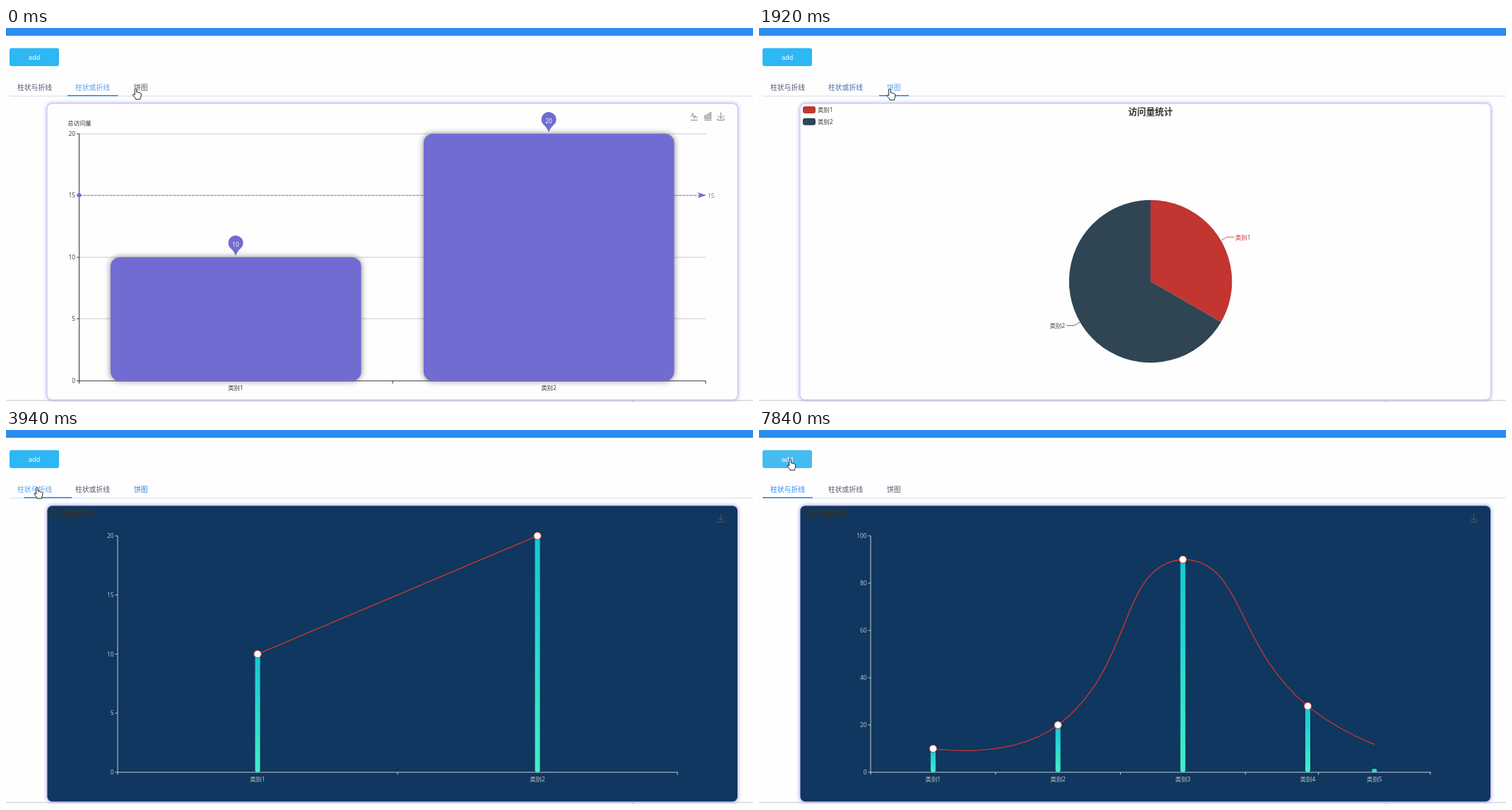
An HTML page with a canvas for the animation above (7.99 s loop, 1057 px wide and 530 px high).

```html
<!DOCTYPE html>
<html lang="zh">
<head>
<meta charset="utf-8">
<style>
html, body { margin: 0; width: 100%; height: 100%; overflow: hidden; background: #fefefe; }
canvas { display: block; }
</style>
</head>
<body>
<canvas id="stage" width="1057" height="530"></canvas>
<script>
const c = document.getElementById('stage').getContext('2d');
const LOOP = 7990, SMALL = 8.4, MEDIUM = 9.8, LARGE = 12.6;
const SANS = '"Open Sans", "Noto Sans CJK SC", "Noto Sans CJK", sans-serif';
const BLUE = '#2d8cf0', HOVER = '#57a3f3', INK = '#515a6e';
const PURPLE = '#716cd1', RED = '#c23531', SLATE = '#2f4554', NAVY = '#0f375f';

// The screen refreshes in bursts: [first, last, steps]
const bursts = [[0, 0, 1], [120, 1000, 7], [1160, 1470, 3], [1770, 1920, 2], [2040, 2740, 6],
  [2860, 3670, 7], [3940, 4360, 4], [4630, 4780, 2], [4900, 5590, 6], [5740, 5740, 1],
  [6140, 6140, 1], [6420, 6420, 1], [6540, 7320, 7], [7470, 7840, 3]];
const ticks = bursts.flatMap(([a, b, n]) =>
  Array.from({ length: n }, (_, i) => Math.round(a + (b - a) * i / Math.max(n - 1, 1))));

// Pointer path: [time, x, y]
const route = [[0, 183.5, 85], [120, 250, 100], [267, 430, 130], [413, 570, 155], [560, 602, 164],
  [707, 606, 166], [860, 606, 166], [1000, 235, 83], [1160, 186, 86], [1470, 185, 86], [1920, 185, 86],
  [2040, 187, 89], [2320, 250, 190], [2740, 425, 330], [2860, 470, 345], [3000, 475, 348],
  [3130, 410, 300], [3400, 130, 125], [3535, 55, 86], [3670, 44, 81], [3940, 44, 81],
  [4080, 44, 76], [4220, 44, 50], [4360, 44, 41]];

const buttonShades = [[0, '#2db7f5'], [4200, '#57c5f7'], [4620, '#2baee9'], [4759, '#57c5f7'],
  [6050, '#2baee9'], [6310, '#57c5f7'], [7600, '#2baee9'], [7720, '#57c5f7']];
const tabs = [
  { name: '柱状与折线', x: 16, left: 5, width: 71,
    shades: [[0, INK], [3480, HOVER], [4100, BLUE]] },
  { name: '柱状或折线', x: 98, left: 87, width: 71.5,
    shades: [[0, HOVER], [20, BLUE], [1750, INK]] },
  { name: '饼图', x: 181, left: 170, width: 42,
    shades: [[0, INK], [40, HOVER], [120, INK], [1080, HOVER], [2050, BLUE], [3880, INK]] }
];
const values = [10, 20, 90, 28, 4], adds = [4759, 6386, 7772];

const icons = {
  line: 'M4.1,28.9h7.1l9.3-22l7.4,38l9.7-19.7l3,12.8h14.9M4.1,58h51.4',
  bar: 'M6.7,22.9h10V48h-10zM24.9,13h10v35h-10zM43.2,2h10v46h-10zM3.1,58h53.7',
  save: 'M4.7,22.9L29.3,45.5L54.7,23.4M4.6,43.6V58H53.8V43.6M29.2,45.1V0'
};
const arrow = new Path2D('M0 0V11.5L2.7 9 4.6 13 6.4 12.2 4.6 8.4H8Z');
const hand = new Path2D('M-1.3 1.2Q0-.6 1.3 1.2V6L3 5.6Q4 5.8 4.2 6.8L5.6 6.6 6.8 7.6 7.8 8V11Q7.5 13 6.5 14.5V16H-.3V14.5L-4 10.2Q-4.3 8.6-2.8 8.8L-1.3 10Z');

const clamp = (v, a = 0, b = 1) => Math.min(Math.max(v, a), b);
const lerp = (a, b, p) => a + (b - a) * p;
const cubicOut = p => 1 - (1 - p) ** 3;
const expOut = p => p >= 1 ? 1 : 1 - 2 ** (-10 * p);
const elasticOut = p => p <= 0 ? 0 : p >= 1 ? 1 : 2 ** (-10 * p) * Math.sin((p - .1) * 5 * Math.PI) + 1;

function rgb(color) {
  return [1, 3, 5].map(i => parseInt(color.substr(i, 2), 16));
}
function shade(list, t, time) {
  let now = rgb(list[0][1]);
  for (const [start, color] of list.slice(1)) {
    const p = clamp((t - start) / time), next = rgb(color);
    now = now.map((v, i) => lerp(v, next[i], p));
  }
  return `rgb(${now.map(Math.round)})`;
}
function text(s, x, y, size = SMALL, color = '#333', align = 'left', weight = 400, family = SANS) {
  c.font = `${weight} ${size}px ${family}`;
  c.textAlign = align;
  c.fillStyle = color;
  c.fillText(s, x, y + size * .37);
}
function rect(x, y, w, h, color) {
  c.fillStyle = color;
  c.fillRect(x, y, w, h);
}
function round(x, y, w, h, r, color) {
  c.beginPath();
  c.roundRect(x, y, w, h, r);
  c.fillStyle = color;
  c.fill();
}
function dot(x, y, r, color) {
  c.beginPath();
  c.arc(x, y, r, 0, 7);
  c.fillStyle = color;
  c.fill();
}
function stroke(color, width) {
  c.strokeStyle = color;
  c.lineWidth = width;
  c.stroke();
}
function polyline(points, color, width) {
  c.beginPath();
  points.forEach(p => c.lineTo(...p));
  stroke(color, width);
}
function icon(name, x) {
  c.save();
  c.translate(x, 119.5);
  c.scale(.19, .19);
  c.strokeStyle = '#666';
  c.lineWidth = 4;
  c.stroke(new Path2D(icons[name]));
  c.restore();
}

function page(t, active) {
  rect(0, 0, 1057, 530, '#fefefe');
  rect(0, 0, 1057, 11, BLUE);
  round(5, 28.5, 70, 25.5, 3, shade(buttonShades, t, 200));
  text('add', 40, 41, MEDIUM, '#fff', 'center', 400, '"Liberation Sans", Arial, sans-serif');
  rect(5, 96, 1052, 1, '#dcdee2');
  for (const tab of tabs) text(tab.name, tab.x, 84, MEDIUM, shade(tab.shades, t, 300));
  const from = tabs[active === 0 ? 2 : 1], to = tabs[active];
  const p = cubicOut(clamp((t - (active === 0 ? 3840 : 1700)) / 200));
  rect(lerp(from.left, to.left, p), 95, lerp(from.width, to.width, p), 1.6, BLUE);
  rect(0, 527, 1057, 1.5, '#d9d9dc');
  rect(886, 528, 2, 2, '#cfcfd2');

  c.save();
  c.shadowColor = '#8a80f0';
  c.shadowBlur = 5;
  c.beginPath();
  c.roundRect(58.5, 107.5, 976.5, 419, 7);
  stroke('#c5c0f3', 2);
  c.restore();
  c.fillStyle = active ? '#fefefe' : NAVY;
  c.fill();
}

function pin(x, top, value) {
  const y = top - 20.5;
  c.beginPath();
  c.arc(x, y, 10.5, .8 * Math.PI, 2.2 * Math.PI);
  c.quadraticCurveTo(x + 2, y + 12, x, y + 18.5);
  c.quadraticCurveTo(x - 2, y + 12, x - 8.5, y + 6.2);
  c.fillStyle = PURPLE;
  c.fill();
  text(value, x, y + 2, SMALL, '#fff', 'center');
}

function barChart(t) {
  text('总访问量', 104, 135, SMALL, '#333', 'center');
  for (let v = 0; v <= 20; v += 5) {
    const y = Math.round(500 - v * 17.52);
    if (v) rect(104, y - .5, 886, 1, '#ccc');
    rect(100, y - .5, 4, 1, '#333');
    text(v, 98, y, SMALL, '#333', 'right');
  }
  rect(103, 150, 1, 350, '#333');
  rect(103, 499.5, 887, 1, '#333');
  for (const x of [103, 546.5, 989.5]) rect(x, 500, 1, 4, '#333');
  [10, 20].forEach((v, i) => {
    const x = 148 + 443 * i, top = 500 - v * 17.5;
    const lit = i && t >= 500 && t < 950;
    c.save();
    c.shadowColor = 'rgba(0,0,0,.5)';
    c.shadowBlur = 8;
    round(x, top, 354.5, 500 - top, 13, lit ? '#7d77e6' : PURPLE);
    c.restore();
    text('类别' + (i + 1), x + 177, 510, SMALL, '#333', 'center');
  });
  c.setLineDash([3.5, 1.8]);
  polyline([[104, 237.3], [982, 237.3]], PURPLE, .8);
  c.setLineDash([]);
  dot(103.5, 237, 3, PURPLE);
  c.fillStyle = PURPLE;
  c.fill(new Path2D('M991 237L978.5 233 981.5 237 978.5 241Z'));
  text('15', 993, 238, SMALL, PURPLE);
  pin(325, 325, '10');
  pin(768, 150, '20');
  icon('line', 968);
  icon('bar', 987.5);
  icon('save', 1006);
  if (t >= 500 && t < 1100) {
    round(620, 179.5, 73, 36.5, 3, 'rgba(50,50,50,.7)');
    text('类别2', 623.5, 190.5, MEDIUM, '#fff');
    dot(627, 205.5, 3.4, PURPLE);
    text('总访问量: 20', 633, 205.5, MEDIUM, '#fff');
  }
}

function slice(r, from, to, color) {
  c.beginPath();
  c.moveTo(554, 359);
  c.arc(554, 359, r, from * Math.PI, to * Math.PI);
  c.fillStyle = color;
  c.fill();
}
function pieChart(t) {
  const grow = 7 * (elasticOut((t - 2810) / 300) - elasticOut((t - 3110) / 300));
  [RED, SLATE].forEach((color, i) => {
    round(62, 111 + 16.7 * i, 18, 10, 3, color);
    text('类别' + (i + 1), 83, 116 + 16.7 * i);
  });
  text('访问量统计', 554, 118, LARGE, '#333', 'center', 700);
  polyline([[654, 301], [662, 296.3], [672.5, 296.3]], RED, .8);
  polyline([[454.5, 416.5], [446, 421.7], [435, 421.7]], SLATE, .8);
  slice(115.3, -.5, 1 / 6, RED);
  slice(115.3 + grow, 1 / 6, 1.5, SLATE);
  text('类别1', 674, 296.5, SMALL, RED);
  text('类别2', 433, 422, SMALL, SLATE, 'right');
}

function smooth(points) {
  const bound = [0, 1].map(k => {
    const all = points.map(p => p[k]);
    return [Math.min(...all), Math.max(...all)];
  });
  const inside = p => p.map((v, k) => clamp(v, ...bound[k]));
  const dist = (a, b) => Math.hypot(a[0] - b[0], a[1] - b[1]);
  let out = points[0];
  c.beginPath();
  c.moveTo(...out);
  for (let i = 1; i < points.length; i++) {
    const prev = points[i - 1], p = points[i], next = points[i + 1];
    let into = p, leave = p;
    if (next) {
      const ratio = dist(p, next) / (dist(p, next) + dist(p, prev));
      const shift = f => p.map((v, k) => v + (next[k] - prev[k]) * f);
      into = shift(-.5 * (1 - ratio));
      leave = shift(.5 * ratio);
    }
    c.bezierCurveTo(...inside(out), ...inside(into), ...p);
    out = leave;
  }
}

function mixedChart(t) {
  const added = adds.filter(a => t >= a).length, n = 2 + added;
  const age = added ? t - adds[added - 1] : 1e4;
  const p = cubicOut(clamp(age / 300)), old = added ? n - 1 : n;
  const max = added ? 100 : 20, oldMax = added > 1 ? 100 : 20;
  const grey = '#ccc', step = max / (added ? 5 : 4);
  const xAt = (i, count) => 158 + 792 * (i + .5) / count;
  const yAt = (v, top) => 485 - 335 * v / top;
  const moved = (i, q = p) => [lerp(xAt(i, old), xAt(i, n), q),
    lerp(yAt(values[i], oldMax), yAt(values[i], max), q)];
  const place = i => moved(i, i < old ? p : 1);

  text('访问量统计', 62, 118, LARGE, '#333', 'left', 700);
  icon('save', 1006);
  for (let v = 0; v <= max; v += step) {
    const y = v <= 20 ? lerp(yAt(v, oldMax), yAt(v, max), p) : yAt(v, max);
    rect(154.5, y - .5, 3.5, 1, grey);
    text(v, 152.5, y, SMALL, grey, 'right');
  }
  rect(157.5, 150, 1, 335, grey);
  rect(157.5, 484.5, 793, 1, grey);
  for (let i = 0; i <= n; i++) {
    const end = 158 + 792 * i / n;
    const x = i < old ? lerp(158 + 792 * i / old, end, p) : end;
    rect(x - .5, 485, 1, 3.5, grey);
  }
  for (let i = 0; i < n; i++) {
    const [x, y] = place(i);
    const h = (485 - y) * (i < old ? 1 : expOut(clamp(age / 1000)));
    if (h > 0) {
      const fill = c.createLinearGradient(0, 485 - h, 0, 485);
      fill.addColorStop(0, '#14c8d4');
      fill.addColorStop(1, '#43eec6');
      round(x - 3.5, 485 - h, 7, h, Math.min(3.5, h / 2), fill);
    }
    text('类别' + (i + 1), x, 494.5, SMALL, grey, 'center');
  }

  c.save();
  c.beginPath();
  c.rect(xAt(0, n), 149, xAt(n - 1, n) - xAt(0, n), 337);
  c.clip();
  smooth(values.slice(0, n).map((_, i) => moved(i)));
  stroke(RED, 1.4);
  c.restore();
  for (let i = 0; i < n; i++) {
    dot(...place(i), 5.2 * (i < old ? 1 : clamp(age / 1000)), '#fff');
    stroke(RED, 1);
  }
}

function pointer(t, active) {
  let i = route.findIndex(k => k[0] > t);
  if (i < 0) i = route.length;
  const a = route[i - 1], b = route[i] || a;
  const p = b === a ? 0 : (t - a[0]) / (b[0] - a[0]);
  const x = lerp(a[1], b[1], p), y = lerp(a[2], b[2], p);
  const onTab = y > 72 && y < 97 && tabs.some(tab => x > tab.left && x < tab.left + tab.width);
  const onButton = x > 5 && x < 75 && y > 28 && y < 54;
  const onBar = active === 1 && x > 591 && y > 150;
  const onPie = active === 2 && Math.hypot(x - 554, y - 359) < 115;
  c.save();
  c.translate(x, y);
  const shape = onTab || onButton || onBar || onPie ? hand : arrow;
  c.fillStyle = '#fff';
  c.fill(shape);
  c.strokeStyle = '#222';
  c.lineWidth = 1;
  c.stroke(shape);
  c.restore();
}

function draw(now) {
  const clock = now % LOOP;
  const t = ticks.filter(k => k <= clock).pop();
  const active = t < 1770 ? 1 : t < 3940 ? 2 : 0;
  page(t, active);
  [mixedChart, barChart, pieChart][active](t);
  pointer(t, active);
}

const start = performance.now();
function loop() {
  draw(performance.now() - start);
  requestAnimationFrame(loop);
}
loop();
</script>
</body>
</html>
```
